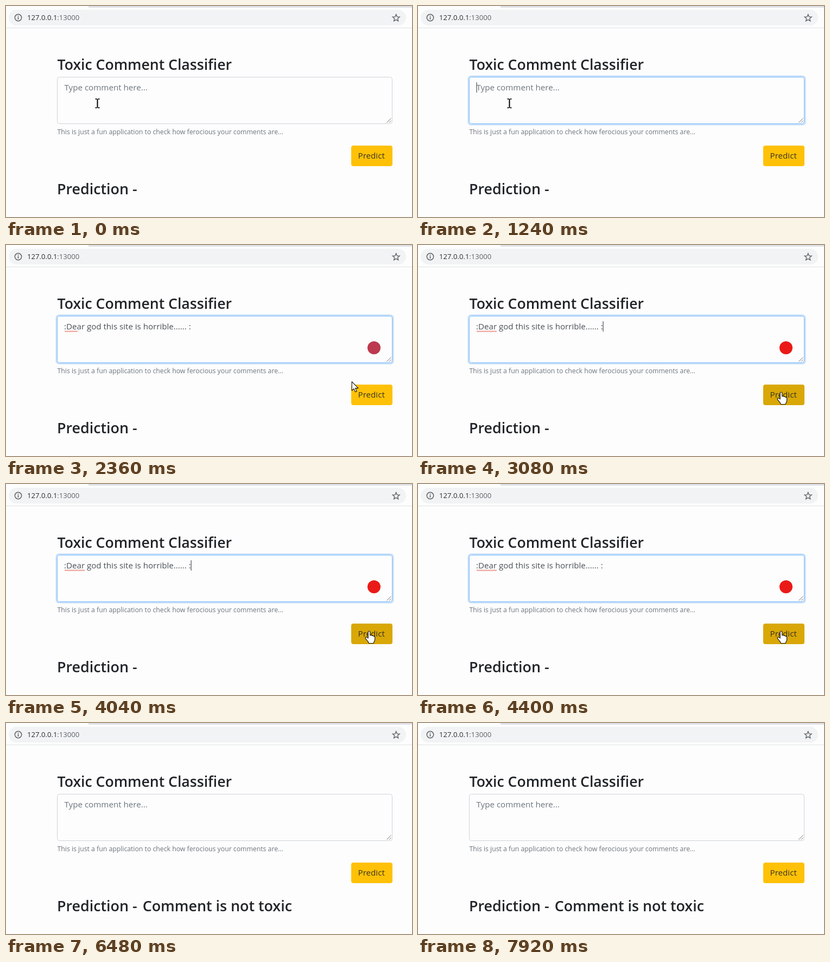
Animation of 748x390 px, one loop 8 s. Source, as an HTML page with a canvas:

```html
<!DOCTYPE html>
<html lang="en">
<head>
<meta charset="utf-8">
<title>Toxic Comment Classifier</title>
<style>
html, body { margin: 0; width: 100%; height: 100%; overflow: hidden; background: #fdfdfd; }
canvas { display: block; width: 748px; height: 390px; }
</style>
</head>
<body>
<canvas id="stage"></canvas>
<script>
const W = 748, H = 390, LOOP = 8000;
const FOCUS = 840, PASTE = 1700, CHECK = 2220, CLICK = 4440, LOADED = 4840, LEAVE = 5900;
const PAGE = '#fdfdfd', INK = '#212529', BODY = '#495057', MUTED = '#6c757d', ICON = '#5f6368';
const FIELD = [94.5, 131.5, 617, 86], BUTTON = [636, 258, 76, 38];

const canvas = document.getElementById('stage');
const ctx = canvas.getContext('2d');
const dpr = window.devicePixelRatio || 1;
canvas.width = W * dpr;
canvas.height = H * dpr;

const clamp = v => Math.max(0, Math.min(1, v));
const ramp = (t, from, to) => clamp((t - from) / (to - from));
const mix = (a, b, k) => `rgb(${a.map((v, i) => Math.round(v + (b[i] - v) * k)).join(',')})`;

// Pointer hotspot: time, x, y
const route = [
  [0, 168.5, 180], [1780, 168.5, 180], [2360, 637, 252.5], [2560, 669, 273],
  [LEAVE, 669, 273], [6100, 688, 180], [6320, 708, -30]
];

function pointerAt(t) {
  const i = route.findIndex(p => p[0] > t);
  if (i < 0) return { x: 708, y: -30 };
  const [t0, x0, y0] = route[i - 1], [t1, x1, y1] = route[i];
  const k = ramp(t, t0, t1);
  return { x: x0 + (x1 - x0) * k, y: y0 + (y1 - y0) * k };
}

const inside = (p, [x, y, w, h]) => p.x >= x && p.x <= x + w && p.y >= y && p.y <= y + h;

function text(str, x, y, size, color, weight = 400) {
  ctx.font = `${weight} ${size}px "Open Sans", "Noto Sans", sans-serif`;
  ctx.fillStyle = color;
  ctx.fillText(str, x, y);
}

function rect(x, y, w, h, color) {
  ctx.fillStyle = color;
  ctx.fillRect(x, y, w, h);
}

function paint(fill, stroke, width = 1) {
  if (fill) { ctx.fillStyle = fill; ctx.fill(); }
  if (stroke) { ctx.strokeStyle = stroke; ctx.lineWidth = width; ctx.stroke(); }
}

function rounded([x, y, w, h], r, ...style) {
  ctx.beginPath();
  ctx.roundRect(x, y, w, h, r);
  paint(...style);
}

function disc(x, y, r, ...style) {
  ctx.beginPath();
  ctx.arc(x, y, r, 0, Math.PI * 2);
  paint(...style);
}

const grow = ([x, y, w, h], d) => [x - d, y - d, w + 2 * d, h + 2 * d];

function cursor(d, { x, y }) {
  const path = new Path2D(d);
  ctx.save();
  ctx.translate(x, y);
  ctx.fillStyle = '#fff';
  ctx.fill(path);
  ctx.strokeStyle = '#111';
  ctx.lineWidth = 1.1;
  ctx.lineJoin = 'round';
  ctx.stroke(path);
  ctx.restore();
}

function drawBrowserBar() {
  rect(152, 0, W - 152, 3, '#dfe1e6');
  rounded([5, 7, 732, 29], 14.5, '#f1f3f4');
  rect(0, 40, W, 1, '#dfe1e4');

  disc(22.5, 21.5, 6.2, null, ICON, 1.5);
  rect(21.7, 20.5, 1.6, 4.5, ICON);
  rect(21.7, 17.8, 1.6, 1.6, ICON);

  text('127.0.0.1', 39, 26, 13.1, '#2b2d31');
  const w = ctx.measureText('127.0.0.1').width;
  text(':13000', 39 + w, 26, 13.1, ICON);

  ctx.beginPath();
  for (let i = 0; i < 10; i++) {
    const a = -Math.PI / 2 + i * Math.PI / 5, r = i % 2 ? 3 : 6.8;
    ctx.lineTo(718.7 + r * Math.cos(a), 22.3 + r * Math.sin(a));
  }
  ctx.closePath();
  paint(null, ICON, 1.4);
}

function drawField(t) {
  const focus = ramp(t, FOCUS, FOCUS + 150) * (1 - ramp(t, CLICK, CLICK + 150));
  const typed = t >= PASTE && t < LOADED;

  if (focus) {
    ctx.globalAlpha = focus;
    rounded(grow(FIELD, 1.7), 5, null, '#c3ddf8', 2.6);
    ctx.globalAlpha = 1;
  }
  rounded(FIELD, 4, PAGE, mix([206, 212, 218], [128, 189, 255], focus));

  if (typed) {
    const line = 37 * ramp(t, CHECK, CHECK + 216);
    if (line) rect(108, 158.5, line, 2.2, '#f0a39b');
    text(':Dear god this site is horrible...... :', 107, 156, 15.1, BODY);
    ctx.globalAlpha = ramp(t, CHECK - 100, CHECK);
    disc(678, 190, 12, mix([184, 60, 84], [234, 26, 24], ramp(t, 2340, 2600)));
    ctx.globalAlpha = 1;
  } else {
    text('Type comment here...', 107.5, 156, 15.15, MUTED);
  }

  const since = t - (typed ? PASTE : FOCUS);
  if (t >= FOCUS && t < CLICK && since % 1000 < 500) {
    rect(typed ? 340.5 : 107.5, 141, 1.2, 19, BODY);
  }

  ctx.beginPath();
  ctx.moveTo(701.5, 215.5); ctx.lineTo(709.5, 207.5);
  ctx.moveTo(706, 215.5); ctx.lineTo(709.5, 212);
  paint(null, '#777');
}

function drawButton(t, p) {
  const pageIdle = t >= LOADED && t <= LEAVE;
  const hover = inside(p, BUTTON) && !pageIdle;
  if (t >= CLICK && t < LOADED) rounded(grow(BUTTON, 1.5), 5, null, '#ffe08a', 3);
  rounded(BUTTON, 4, hover ? '#d9a706' : '#ffc107');
  text('Predict', 648.5, 282, 15.2, '#3a3420');
}

function drawPointer(p) {
  if (p.y < -25) return;
  if (inside(p, BUTTON)) {
    cursor('M-1.8 12V0.6C-1.8-1.6 1.8-1.6 1.8 0.6V7C2.5 5.8 5 6 5.2 7.8C6 6.6 8 7 8.2 8.7' +
      'C9.2 7.8 10.6 8.4 10.6 10V14.5C10.6 17 8.6 18.6 8.2 21.5H-0.6C-0.9 19-2 18-3.5 16.5' +
      'L-6.7 12.4C-7.6 10.6-5.5 9-3.8 10.4Z', p);
  } else if (inside(p, FIELD)) {
    rect(p.x - 1, p.y - 8, 2, 16, '#000');
    for (const dy of [-9, 7.4]) {
      rect(p.x - 4, p.y + dy, 3.2, 1.6, '#000');
      rect(p.x + 0.8, p.y + dy, 3.2, 1.6, '#000');
    }
  } else {
    cursor('M0 0V16.5L3.8 13L6.4 19L9 17.9L6.4 12H11.8Z', p);
  }
}

function draw(t) {
  const p = pointerAt(t);
  ctx.setTransform(dpr, 0, 0, dpr, 0, 0);
  rect(0, 0, W, H, PAGE);
  drawBrowserBar();
  text('Toxic Comment Classifier', 94.5, 117.5, 26.6, INK, 600);
  drawField(t);
  text('This is just a fun application to check how ferocious your comments are...',
    94.5, 237, 12.25, MUTED);
  drawButton(t, p);
  text('Prediction -', 94, 348.3, 26.85, INK, 600);
  if (t >= LOADED) text('Comment is not toxic', 251.7, 348.3, 26.85, INK, 600);
  drawPointer(p);
}

const start = performance.now();
function tick() {
  draw((performance.now() - start) % LOOP);
  requestAnimationFrame(tick);
}
tick();
</script>
</body>
</html>
```
